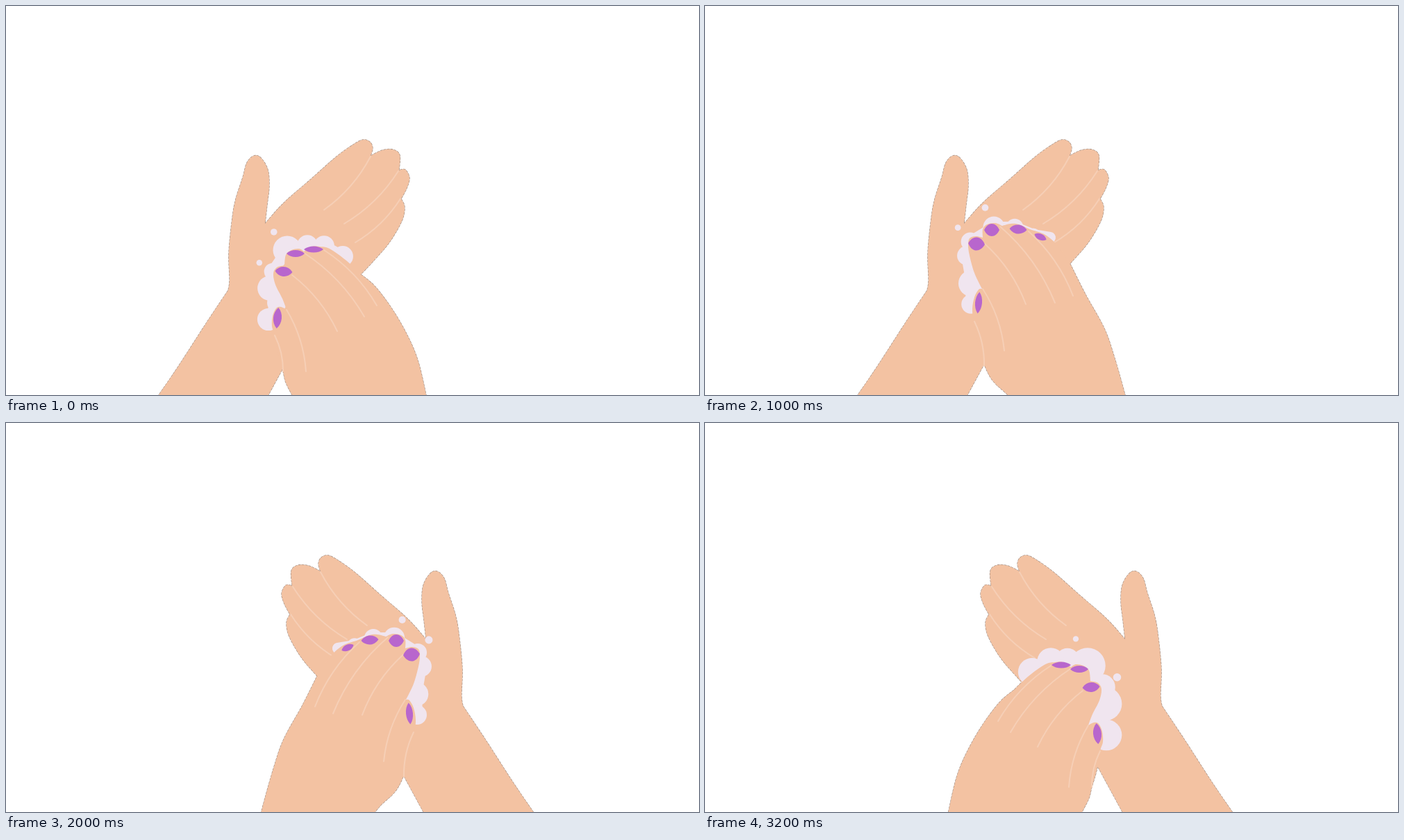
Write an HTML page with a canvas that moves like this. It is 998 px wide and 561 px high and loops after 3400 ms.

```html
<!DOCTYPE html>
<html lang="en">
<head>
<meta charset="utf-8">
<title>Washing hands</title>
<style>
html, body { margin: 0; width: 100%; height: 100%; overflow: hidden; background: #fff; }
canvas { display: block; }
</style>
</head>
<body>
<canvas id="stage" width="998" height="561"></canvas>
<script>
const ctx = document.getElementById('stage').getContext('2d');
const SKIN = '#f3c2a2', CREASE = '#f6cfb6', FOAM = '#f0e5ef', NAIL = '#b866cd', EDGE = 'rgba(105,70,50,.6)';
const STEP = 200, MIRROR = 978;

// Smooth closed curve; "/" makes the point before it a corner.
function shape(text) {
  const groups = text.split('/').map(g => g.trim().split(/\s+/).map(p => p.split(',').map(Number)));
  const path = new Path2D();
  let last = groups[0][0];
  path.moveTo(...last);
  for (const g of groups) {
    const p = [last, ...g];
    for (let i = 0; i < p.length - 1; i++) {
      const a = p[i - 1] || p[i], b = p[i], c = p[i + 1], d = p[i + 2] || c;
      path.bezierCurveTo(b[0] + (c[0] - a[0]) / 6, b[1] + (c[1] - a[1]) / 6,
        c[0] - (d[0] - b[0]) / 6, c[1] - (d[1] - b[1]) / 6, ...c);
    }
    last = p[p.length - 1];
  }
  path.closePath();
  return path;
}

// Line between two points that bows sideways.
function crease([x1, y1, x2, y2]) {
  const path = new Path2D();
  path.moveTo(x1, y1);
  path.quadraticCurveTo((x1 + x2) / 2 + (y2 - y1) * .12, (y1 + y2) / 2 - (x2 - x1) * .12, x2, y2);
  return path;
}

// Pointed oval of a given length, width and tilt in degrees.
function nail([x, y, length, width, tilt]) {
  const path = new Path2D(), oval = new Path2D(), l = length / 2, h = width * 2 / 3;
  oval.moveTo(-l, 0);
  oval.bezierCurveTo(-l / 2, -h, l / 2, -h, l, 0);
  oval.bezierCurveTo(l / 2, h, -l / 2, h, -l, 0);
  path.addPath(oval, new DOMMatrix().translate(x, y).rotate(tilt));
  return path;
}

const palm = {
  outline: shape(
    `206,581 220,561 248,520 288,458 320,410 / 322,395 321,355 326,305 331,278 341,247 347,226 357,216 367,219 377,236 379,260 376,287 373,314 /
     400,284 440,249 475,218 500,200 514,193 524,196 528,205 525,216 / 542,208 557,207 567,215 566,237 / 575,236 581,248 577,263 569,278 /
     574,290 570,310 552,341 528,369 511,387 / 470,440 / 411,500 / 367,581`),
  creases: [[525, 217, 458, 294], [565, 238, 487, 314], [568, 278, 503, 341]].map(crease)
};

const bent = {
  outline: shape(
    `422,581 412,561 403,543 399,527 392,503 387,475 383,462 384,447 389,436 396,434 404,438 / 398,422 388,402 385,386 390,377 401,374 /
     403,359 411,352 422,350 429,354 / 440,347 452,347 466,350 490,367 511,387 / 532,405 558,440 580,479 594,514 605,561 609,581`),
  creases: [[404, 438, 432, 527], [387, 475, 399, 527], [412, 388, 477, 469], [429, 356, 516, 448], [458, 352, 534, 432]].map(crease),
  nails: [[400, 383, 25, 14, 5], [417, 357, 26, 10, 0], [443, 351, 28, 9, 0], [391, 450, 30, 12, 95]].map(nail),
  suds: [[378, 452, 16], [390, 428, 13], [380, 407, 17], [384, 383, 13], [405, 352, 19], [434, 345, 14], [458, 346, 15], [485, 361, 14]]
};

const flat = {
  outline: shape(
    `452,581 436,561 415,541 403,519 394,490 387,455 385,437 388,420 394,409 399,408 / 388,385 381,360 379,345 381,335 390,332 400,334 /
     400,322 406,315 418,313 428,317 / 440,314 452,315 468,322 490,330 508,346 527,374 / 548,416 575,465 590,508 605,561 610,581`),
  creases: [[400, 408, 431, 497], [388, 455, 402, 519], [403, 343, 462, 430], [425, 318, 504, 428], [466, 325, 530, 418]].map(crease),
  nails: [[391, 343, 24, 19, 5], [413, 323, 22, 18, 0], [451, 322, 25, 13, 5], [483, 333, 19, 9, 25], [394, 428, 31, 10, 95]].map(nail),
  suds: [[383, 430, 14], [384, 400, 18], [377, 360, 14], [382, 340, 14], [416, 319, 16], [446, 319, 13], [473, 330, 10], [497, 334, 8]]
};

// Top hand, its shift, and how much foam there is.
const rest = [bent, 0, 0, 1], up = [flat, 0, 0, 1], right = [bent, 18, -15, 1.05], down = [bent, 5, 9, 1.2];
const low = [bent, 8, 9, 1.2], back = [bent, 8, 0, 1], high = [flat, 3, -9, 1], reach = [bent, 23, -15, 1.05], wide = [bent, 22, -2, 1.35];
const leftSteps = [rest, up, right, down, rest, up, right, down];
const rightSteps = [low, back, high, reach, wide, back, high, reach, wide];
const steps = [...leftSteps, ...rightSteps];

function random(n) {
  const s = Math.sin(n * 12.9898) * 43758.5453;
  return s - Math.floor(s);
}

function drawFoam(suds, size, seed) {
  const circle = (x, y, r) => {
    ctx.beginPath();
    ctx.arc(x, y, r, 0, 7);
    ctx.fill();
  };
  ctx.fillStyle = ctx.strokeStyle = FOAM;
  ctx.lineWidth = 16 * size;
  ctx.beginPath();
  suds.forEach(([x, y]) => ctx.lineTo(x, y));
  ctx.stroke();
  suds.forEach(([x, y, r], i) => circle(x, y, r * size * (.92 + .16 * random(seed * 9 + i))));
  // Loose bubbles float just outside the foam.
  for (let i = 0; i < 2; i++) {
    const key = seed * 31 + i * 7;
    const [x, y, r] = suds[2 + i * 2 + Math.floor(random(key) * 2)];
    const angle = Math.atan2(y - 440, x - 470), far = r * size + 8 + 7 * random(key + 1);
    circle(x + far * Math.cos(angle), y + far * Math.sin(angle), 3 + 3 * random(key + 2));
  }
}

function drawSkin({ outline, creases }) {
  ctx.fillStyle = SKIN;
  ctx.fill(outline);
  ctx.strokeStyle = CREASE;
  ctx.lineWidth = 2;
  creases.forEach(c => ctx.stroke(c));
}

function draw(index) {
  const [hand, dx, dy, size] = steps[index];
  ctx.setTransform(1, 0, 0, 1, 0, 0);
  ctx.clearRect(0, 0, 998, 561);
  const swapped = index >= leftSteps.length;
  if (swapped) ctx.transform(-1, 0, 0, 1, MIRROR, 0);
  const at = (x, y, paint) => {
    ctx.save();
    ctx.translate(x, y);
    paint();
    ctx.restore();
  };
  const onPalm = paint => at(0, swapped ? -2 : 0, paint);
  const onHand = paint => at(dx, dy, paint);
  const rim = part => {
    ctx.strokeStyle = EDGE;
    ctx.lineWidth = 1.3;
    ctx.setLineDash([3, 2]);
    ctx.stroke(part.outline);
  };
  ctx.lineCap = ctx.lineJoin = 'round';
  onPalm(() => rim(palm));
  onHand(() => rim(hand));
  onPalm(() => drawSkin(palm));
  onHand(() => {
    drawFoam(hand.suds, size, index + 1);
    drawSkin(hand);
    ctx.fillStyle = NAIL;
    hand.nails.forEach(n => ctx.fill(n));
  });
}

function frame() {
  draw(Math.floor(performance.now() / STEP) % steps.length);
  requestAnimationFrame(frame);
}
frame();
</script>
</body>
</html>
```
